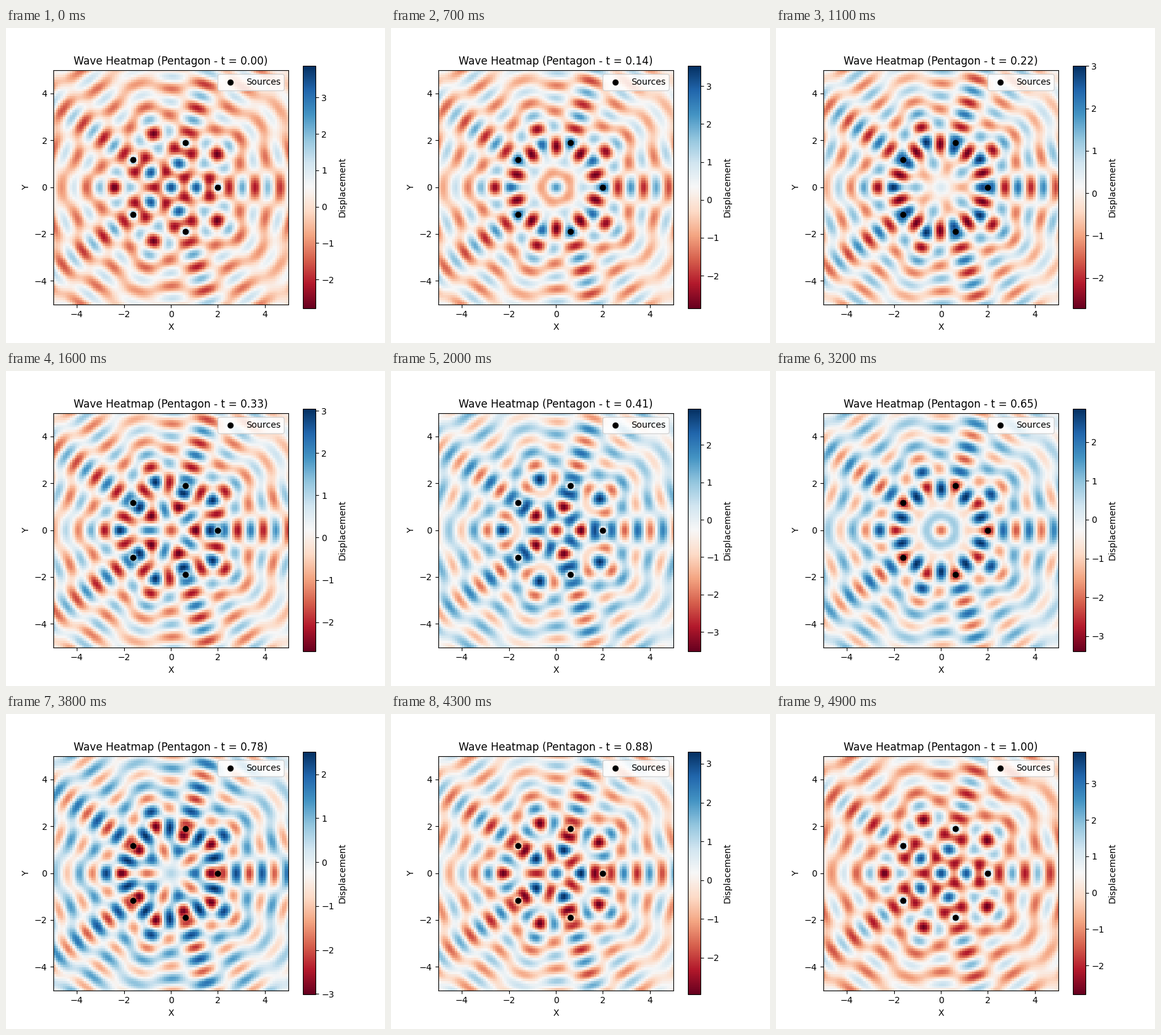
Write a matplotlib script that moves like this. It is 600 by 500 pixels and loops after 5 s.

```python
import numpy as np
import matplotlib.pyplot as plt
from matplotlib.animation import FuncAnimation

FRAMES = 50
INTERVAL = 100
HALF_WIDTH = 5
GRID_POINTS = 100
RADIUS = 2
WAVELENGTH = 1.0
PERIOD = 1.0

angles = 2 * np.pi * np.arange(5) / 5
sources_x, sources_y = RADIUS * np.cos(angles), RADIUS * np.sin(angles)

axis = np.linspace(-HALF_WIDTH, HALF_WIDTH, GRID_POINTS)
grid_x, grid_y = np.meshgrid(axis, axis)
distances = [np.hypot(grid_x - x, grid_y - y)
             for x, y in zip(sources_x, sources_y)]
times = np.linspace(0, PERIOD, FRAMES)


def displacement(t):
    """Sum of circular waves whose amplitude falls with sqrt(distance)."""
    return sum(np.cos(2 * np.pi * (r / WAVELENGTH - t / PERIOD)) / np.sqrt(r)
               for r in distances)


fig, ax = plt.subplots(figsize=(6, 5), dpi=100)
image = ax.imshow(displacement(0), cmap="RdBu", origin="lower",
                  extent=[-HALF_WIDTH, HALF_WIDTH] * 2)
fig.colorbar(image, ax=ax, label="Displacement")
ax.scatter(sources_x, sources_y, color="black", label="Sources")
ax.set_xlabel("X")
ax.set_ylabel("Y")
ax.legend(loc="upper right")
title = ax.set_title("")


def update(frame):
    t = times[frame]
    field = displacement(t)
    image.set_data(field)
    image.set_clim(field.min(), field.max())
    title.set_text(f"Wave Heatmap (Pentagon - t = {t:.2f})")
    return image, title


animation = FuncAnimation(fig, update, frames=FRAMES, interval=INTERVAL,
                          repeat=True, repeat_delay=0, blit=False)
plt.show()
```
